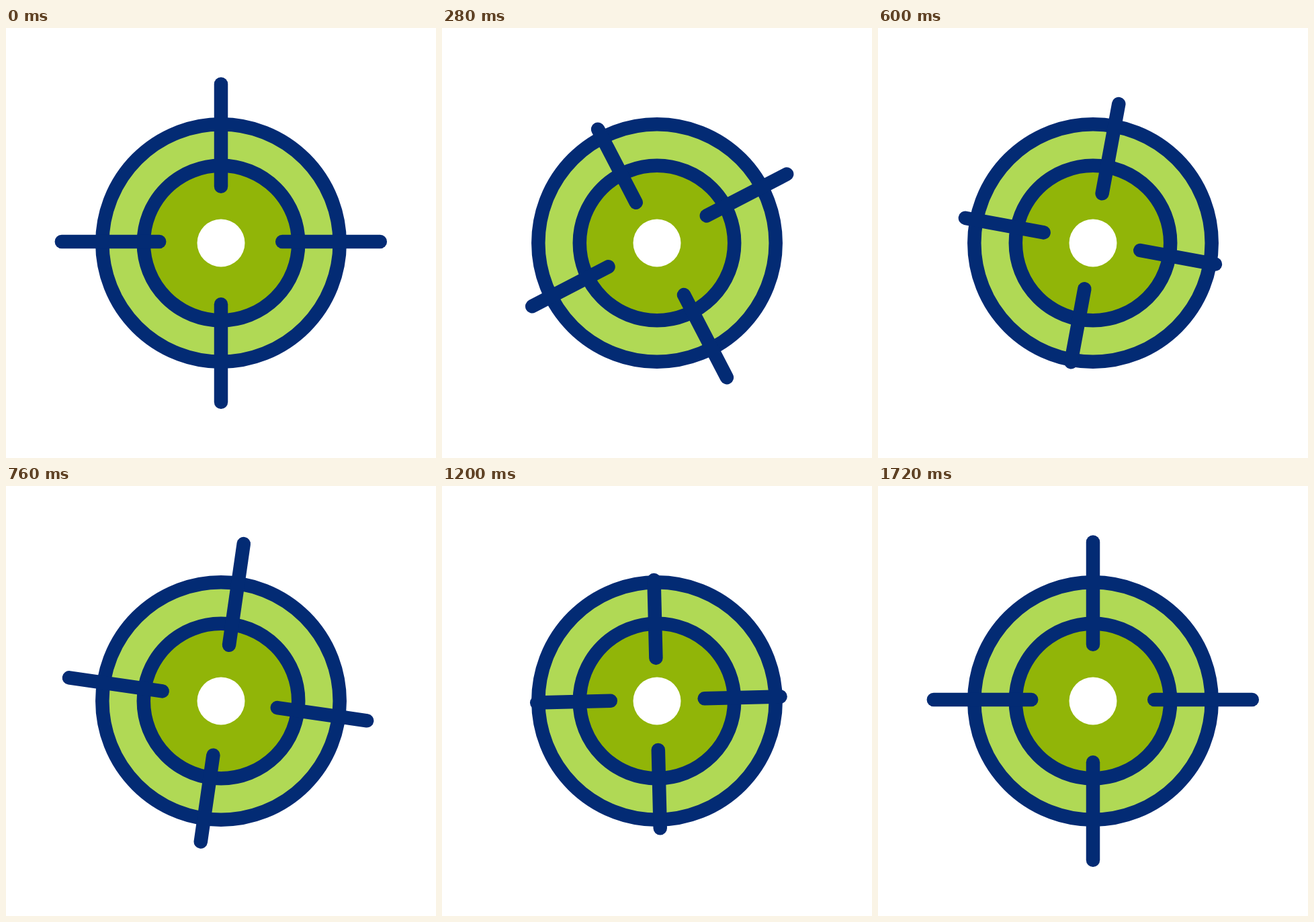
These frames come from a looping animation (640x640 px, 2 s). An HTML page:

```html
<!DOCTYPE html>
<html lang="en">
<head>
<meta charset="utf-8">
<title>Crosshair</title>
<style>
  html, body { margin: 0; width: 100%; height: 100%; overflow: hidden; background: #fff; }
  svg { display: block; width: 100%; height: 100%; }
  .line { stroke: #032b74; stroke-width: 20.5; stroke-linecap: round; }
</style>
</head>
<body>
<svg viewBox="-320 -320 640 640">
  <circle class="line" r="176.7" fill="#b0d955"/>
  <circle class="line" r="115.2" fill="#91b508"/>
  <circle r="35.5" fill="#fff"/>
  <g id="arms"></g>
</svg>
<script>
  const LOOP = 2000, STEP = 40, REST = 1720;
  const HALF_PULSE = 378, PULSES = 2, SHRINK = 0.25;

  // Swing of the whole cross: [time, degrees]
  const SWING = [[0, 0], [326, -29], [648, 13], [980, -5.1], [1318, 0]];

  // Direction, inner and outer reach, sideways offset, start of the pulse
  const ARMS = [
    { dx: 0, dy: -1, inner: 84.2, outer: 236.6, shift: 0, start: 18 },
    { dx: -1, dy: 0, inner: 91.8, outer: 237.2, shift: -2, start: 94 },
    { dx: 1, dy: 0, inner: 91.2, outer: 236.8, shift: -2, start: 141 },
    { dx: 0, dy: 1, inner: 91.2, outer: 236.8, shift: 0, start: 174 }
  ];

  const group = document.getElementById('arms');
  for (const arm of ARMS) {
    arm.node = document.createElementNS(group.namespaceURI, 'line');
    arm.node.setAttribute('class', 'line');
    group.append(arm.node);
  }

  const ease = u => u * u * (3 - 2 * u);

  function swingAt(t) {
    const next = SWING.findIndex(([time]) => time > t);
    if (next < 0) return 0;
    const [t0, a0] = SWING[next - 1], [t1, a1] = SWING[next];
    return a0 + (a1 - a0) * ease((t - t0) / (t1 - t0));
  }

  function scaleAt(t) {
    const u = t / HALF_PULSE;
    if (u <= 0 || u >= 2 * PULSES) return 1;
    return 1 - SHRINK * ease(1 - Math.abs(u % 2 - 1));
  }

  function draw(t) {
    const resting = t >= REST;
    group.setAttribute('transform', `rotate(${resting ? 0 : swingAt(t)})`);
    for (const { dx, dy, inner, outer, shift, start, node } of ARMS) {
      const scale = resting ? 1 : scaleAt(t - start);
      [inner, outer].forEach((reach, i) => {
        node.setAttribute(`x${i + 1}`, dx * reach * scale);
        node.setAttribute(`y${i + 1}`, dy * reach * scale + shift);
      });
    }
  }

  let origin;
  function tick(now) {
    origin ??= now;
    const t = (now - origin) % LOOP;
    draw(Math.floor(t / STEP) * STEP);
    requestAnimationFrame(tick);
  }
  draw(0);
  requestAnimationFrame(tick);
</script>
</body>
</html>
```
